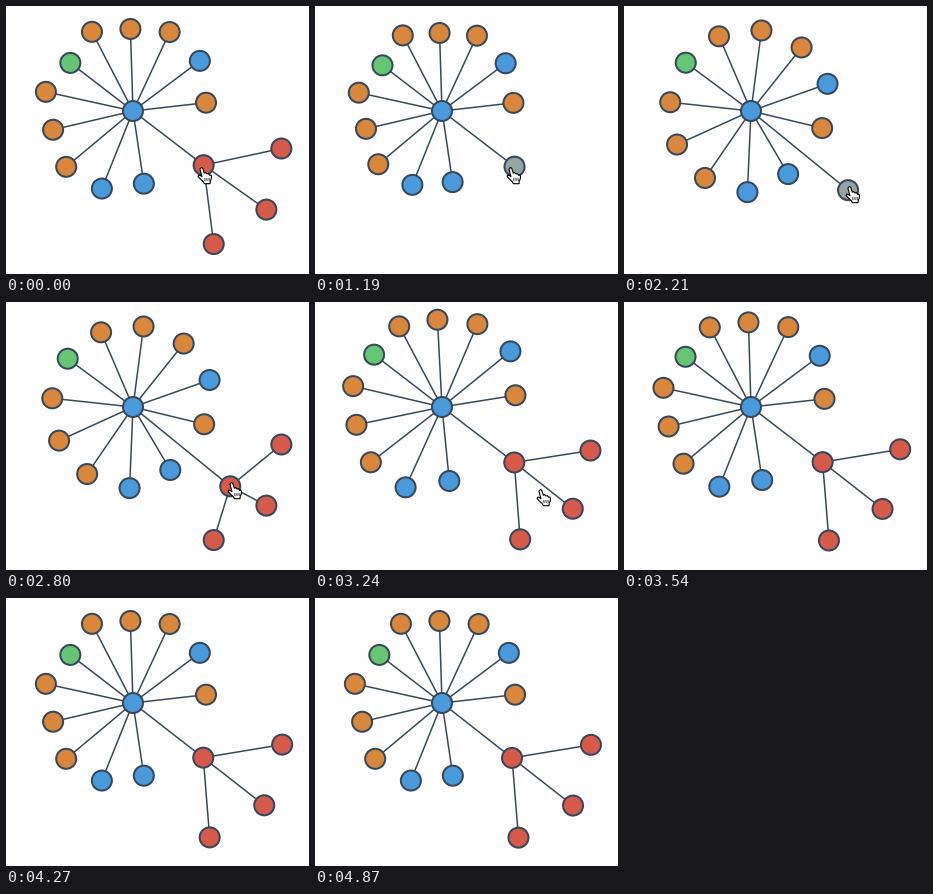
A matplotlib script that plays this animation: 303 by 268 pixels, repeating every 4.89 s.

```python
import numpy as np
import matplotlib.pyplot as plt
from matplotlib.animation import FuncAnimation
from matplotlib.collections import LineCollection
from matplotlib.patches import Circle, Polygon

W, H, DPI = 303, 268, 64
PX = 72 / DPI
TICK, LOOP = 10, 4890
HOLD, STEP = 1190, 147          # opening hold, then one pose per step (ms)
REOPEN, CURSOR_GONE = 11, 16    # in steps

INK, RED, GREY, BLUE = "#34475b", "#d65a49", "#96a3a5", "#4a99da"
PALETTE = {"b": BLUE, "o": "#d9873c", "g": "#66c573", "r": RED}
CENTER = np.array([127, 105])
LEAVES = np.arange(-5, 6)       # numbered from the leaf opposite the hub


def polar(origin, degrees, radius):
    a = np.radians(degrees)
    return origin + np.stack([radius * np.cos(a), radius * np.sin(a)], -1)


def mix(a, b, u):
    return a + (b - a) * u


def spring(n):
    """Step response of a damped spring, n steps after its release."""
    return 1 - np.exp(-0.68 * n) * np.cos(n)


def fold_at(step):
    """0 when the hub is open, 1 when it is collapsed, with overshoot."""
    if step < 0:
        return 0
    return spring(step) if step < REOPEN else 1 - spring(step - REOPEN)


def swell_at(step):
    """Extra radius while the ring is squeezed or pushed."""
    return np.interp(step, [-1, 0, 3, 7, REOPEN, 14, 18], [0, -4, 1, 0, 0, 3.5, 0])


def leaf_ring(fold, swell):
    """Leaves spread evenly away from the hub, the outermost pulled in."""
    n = abs(LEAVES)
    angle = 217.5 - fold + mix(25, 30.3, fold) * LEAVES + mix(0.088, 0.045, fold) * LEAVES**3
    ripple = 6 * (1 - fold) - max(swell, 0)
    notch = mix(12.5, 8, fold) + 0.6 * swell
    radius = mix(85, 81.2, fold) + swell - ripple * (-0.7) ** n - notch * (n == 5)
    return polar(CENTER, angle, radius)


def hub_at(step, fold, swell):
    angle = np.interp(step, [0, 3, 7, REOPEN, 14, 25], [37.5, 36.7, 39.2, 39.2, 37.5, 38.1])
    reach = mix(89, 125.5, max(fold, 0)) + 0.6 * abs(swell)
    return polar(CENTER, angle, reach)


def fan(hub, angle, reach):
    """Three children around the hub, the middle one slightly closer."""
    m = np.array([-1, 0, 1])
    return polar(hub, angle + 47.4 * m, reach - 2.6 * (m == 0))


KIDS_START = fan(hub_at(-1, 0, 0), 35.3, 79.5)


def layout(step):
    fold, swell = fold_at(step), swell_at(step)
    hub = hub_at(step, fold, swell)
    kids = KIDS_START
    if step >= REOPEN:
        kids = mix(kids, fan(hub, 38, 80 - 0.8 * swell), spring(step - REOPEN))
    return np.vstack([leaf_ring(fold, swell), hub, kids])


fig = plt.figure(figsize=(W / DPI, H / DPI), dpi=DPI, facecolor="#fefefe")
ax = fig.add_axes([0, 0, 1, 1])
ax.set(xlim=(0, W), ylim=(H, 0))
ax.axis("off")


def add_lines(color, width, z):
    return ax.add_collection(LineCollection([], colors=color, linewidths=width * PX, zorder=z))


def add_node(color):
    return ax.add_patch(Circle(CENTER, 10, fc=color, ec=INK, lw=2 * PX, zorder=2))


links = add_lines(INK, 1.5, 1)
nodes = [add_node(PALETTE[c]) for c in "bbooogooobo" + "rrrr"]
add_node(BLUE)
HUB = len(LEAVES)

# Hand pointer, relative to its fingertip
HAND = np.array([(-1.6, 1.5), (0, 0), (1.2, 0.8), (2.9, 5.7), (4, 5), (5.5, 6.5), (6.7, 6),
                 (8.2, 7.8), (9.3, 7.5), (10, 8.8), (9.8, 11.4), (8.8, 13.5), (8.5, 16.2),
                 (2.9, 16.2), (1.9, 14.3), (-1, 11.6), (-3.4, 9.2), (-3, 7.7), (-1.1, 8),
                 (0.4, 9.2)])
CREASES = [np.array([(x, 10.5), (x + 0.2, 13.5)]) for x in (3.3, 5.4, 7.5)]
hand = ax.add_patch(Polygon(HAND, fc="white", ec="black", lw=1.1 * PX,
                            joinstyle="round", zorder=4))
creases = add_lines("black", 0.8, 5)


def draw(i):
    step = max(-1, (i * TICK - HOLD + TICK - 1) // STEP)
    is_open = step < 0 or step >= REOPEN
    pos = layout(step)
    shown = len(pos) if is_open else HUB + 1
    for j, (n, p) in enumerate(zip(nodes, pos)):
        n.center = p
        n.set_visible(j < shown)
    nodes[HUB].set_facecolor(RED if is_open else GREY)
    links.set_segments([(CENTER if j <= HUB else pos[HUB], pos[j]) for j in range(shown)])

    tip = np.array([np.interp(step, [4, 7], [195.5, 225.5]),
                    np.interp(step, [4, 7, REOPEN, 14], [161.5, 180.5, 180.5, 187.5])])
    hand.set_xy(HAND + tip)
    creases.set_segments([c + tip for c in CREASES])
    for part in (hand, creases):
        part.set_visible(step < CURSOR_GONE)
    return [links, *nodes, hand, creases]


anim = FuncAnimation(fig, draw, frames=LOOP // TICK, interval=TICK,
                     repeat=True, repeat_delay=0, blit=False)
plt.show()
```
